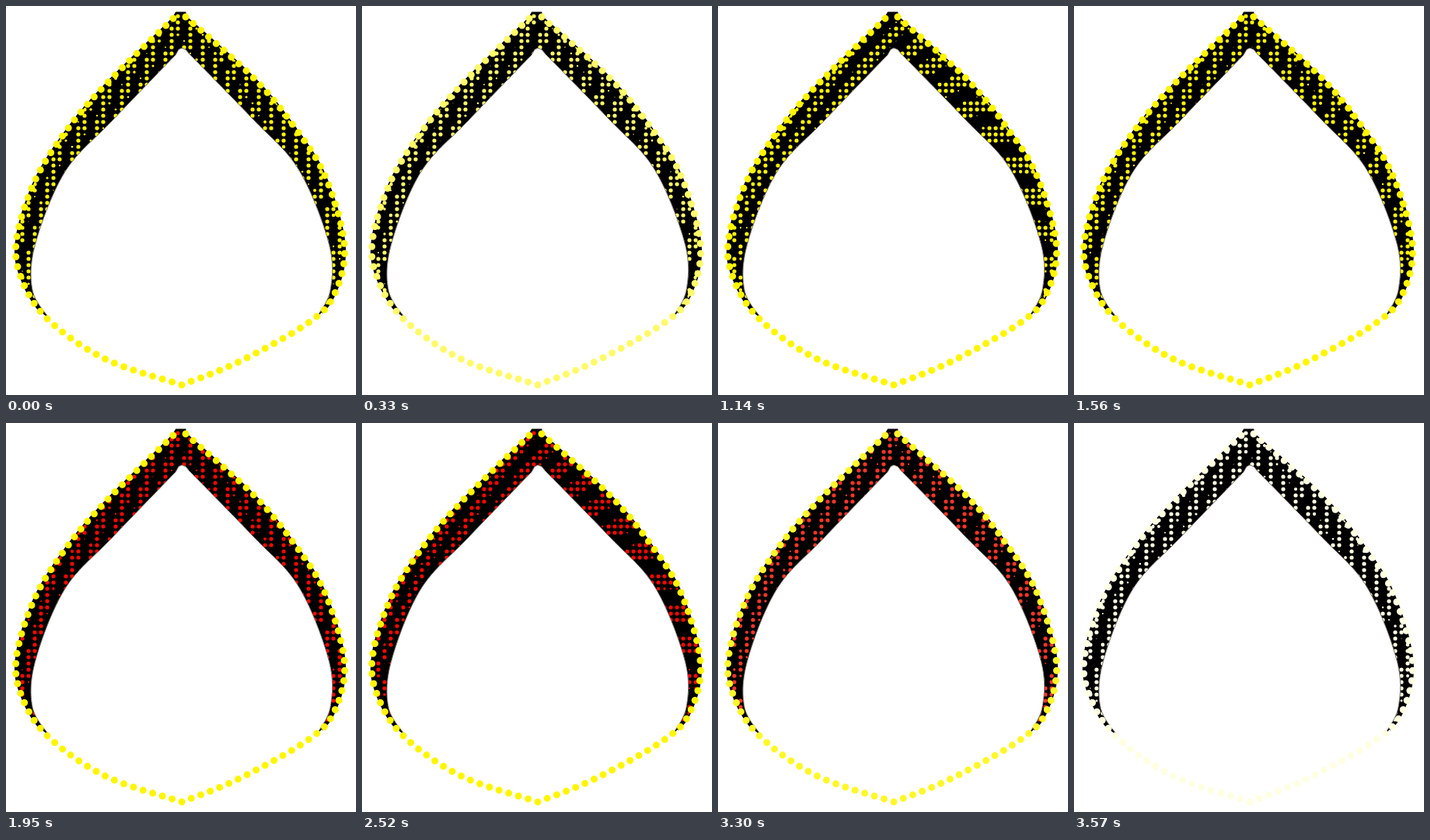
Animation, 450 px wide and 500 px high, one loop 3600 ms. Source, as an HTML page with a canvas:

```html
<!DOCTYPE html>
<html lang="en">
<head>
<meta charset="utf-8">
<title>Dotted petal</title>
<style>
html, body { margin: 0; width: 100%; height: 100%; overflow: hidden; background: #fff; }
canvas { display: block; }
</style>
</head>
<body>
<canvas id="stage" width="450" height="500"></canvas>
<script>
const ctx = document.getElementById('stage').getContext('2d');
const LOOP = 3600, SWEEP = 1800, STEP = 30, PITCH = 8, BEADS = 52;
const YELLOW = [255, 246, 0], RED = [246, 8, 0], PALE = [255, 255, 226];

const clamp = v => Math.max(0, Math.min(1, v));
const mix = (a, b, u) => a.map((v, i) => v + (b[i] - v) * u);
const css = c => `rgb(${c.map(Math.round)})`;

// Catmull-Rom spline sampled into a dense polyline
function spline(pts) {
  const out = [];
  for (let i = 0; i < pts.length - 1; i++) {
    const a = pts[i - 1] || pts[i], b = pts[i], c = pts[i + 1], d = pts[i + 2] || c;
    for (let u = 0; u < 1; u += 1 / 32) {
      out.push([0, 1].map(k => b[k] + 0.5 * u * (c[k] - a[k]
        + u * (2 * a[k] - 5 * b[k] + 4 * c[k] - d[k]
        + u * (3 * (b[k] - c[k]) + d[k] - a[k])))));
    }
  }
  return [...out, pts[pts.length - 1]];
}

// n points at equal distances along a polyline
function spread(line, n) {
  const len = [0];
  for (let i = 1; i < line.length; i++) {
    len.push(len[i - 1] + Math.hypot(line[i][0] - line[i - 1][0], line[i][1] - line[i - 1][1]));
  }
  let j = 1;
  return Array.from({ length: n }, (_, i) => {
    const at = len[len.length - 1] * i / (n - 1);
    while (j < line.length - 1 && len[j] < at) j++;
    return mix(line[j - 1], line[j], (at - len[j - 1]) / (len[j] - len[j - 1]));
  });
}

function trace(pts) {
  const p = new Path2D();
  pts.forEach(([x, y]) => p.lineTo(x, y));
  return p;
}

const left = spline([[215, 16], [131, 98], [80, 157], [38, 223], [14, 297],
  [19, 348], [53, 402], [128, 454], [226, 487]]);
const right = spline([[231, 14], [318, 92], [369, 153], [410, 218], [435, 306],
  [423, 369], [389, 407], [298, 458], [226, 487]]);
const inner = [
  ...spline([[57, 403], [34, 365], [38, 305], [76, 213], [137, 147], [218, 63]]),
  [222, 56], [226, 54], [231, 56],
  ...spline([[236, 62], [316, 144], [376, 210], [415, 305], [417, 365], [398, 402]])
];

const beads = [...spread(left, BEADS), ...spread(right, BEADS).slice(0, -1)];
const upper = line => line.filter(p => p[1] < 394);
const rim = [...upper(left).reverse(), [219, 9], [230, 9], ...upper(right)];
const rimPath = trace(rim);
const hole = trace(inner);
const band = trace([...rim, ...inner.slice().reverse()]);

function dots(list, color) {
  ctx.fillStyle = color;
  ctx.beginPath();
  for (const [x, y, r] of list) {
    ctx.moveTo(x + r, y);
    ctx.arc(x, y, r, 0, 2 * Math.PI);
  }
  ctx.fill();
}

// Slanted stripes drift by one period per sweep; they bend towards the right and straighten again
function halftone(t) {
  const p = t % SWEEP / SWEEP;
  const bend = (1 - Math.cos(2 * Math.PI * p ** 1.1)) / 2;
  const list = [];
  for (let y = 13; y < 384; y += PITCH) {
    for (let x = 21; x < 434; x += PITCH) {
      const dx = x - 225, dy = y - 42;
      const phase = 0.5 - p - 0.046 * dx - 0.012 * dy
        + bend * (0.024 * dx + 0.0000875 * dx * dx - 0.014 * dy);
      const r = 2.6 * clamp((Math.cos(2 * Math.PI * phase) + 0.45) / 0.6);
      if (r > 0.4) list.push([x, y, r]);
    }
  }
  return list;
}

function paleness(t) {
  if (t > 3240) return (t - 3240) / 330;
  return 0.6 * clamp(1 - Math.abs(t - 270) / 270);
}

function draw(t) {
  const pale = paleness(t);
  ctx.fillStyle = '#fff';
  ctx.fillRect(0, 0, 450, 500);

  ctx.fillStyle = ctx.strokeStyle = '#000';
  ctx.fill(band);
  ctx.lineWidth = 3;
  ctx.stroke(rimPath);

  ctx.save();
  ctx.clip(band);
  dots(halftone(t), css(mix(t < SWEEP ? YELLOW : RED, PALE, pale)));
  ctx.restore();

  ctx.fillStyle = '#fff';
  ctx.fill(hole);
  ctx.strokeStyle = '#77716a';
  ctx.lineWidth = 1;
  ctx.stroke(hole);

  dots(beads.map(([x, y]) => [x, y, 4.5]), css(mix(YELLOW, PALE, pale)));
}

const start = performance.now();
function tick() {
  const t = (performance.now() - start) % LOOP;
  draw(Math.floor(t / STEP) * STEP);
  requestAnimationFrame(tick);
}
tick();
</script>
</body>
</html>
```
